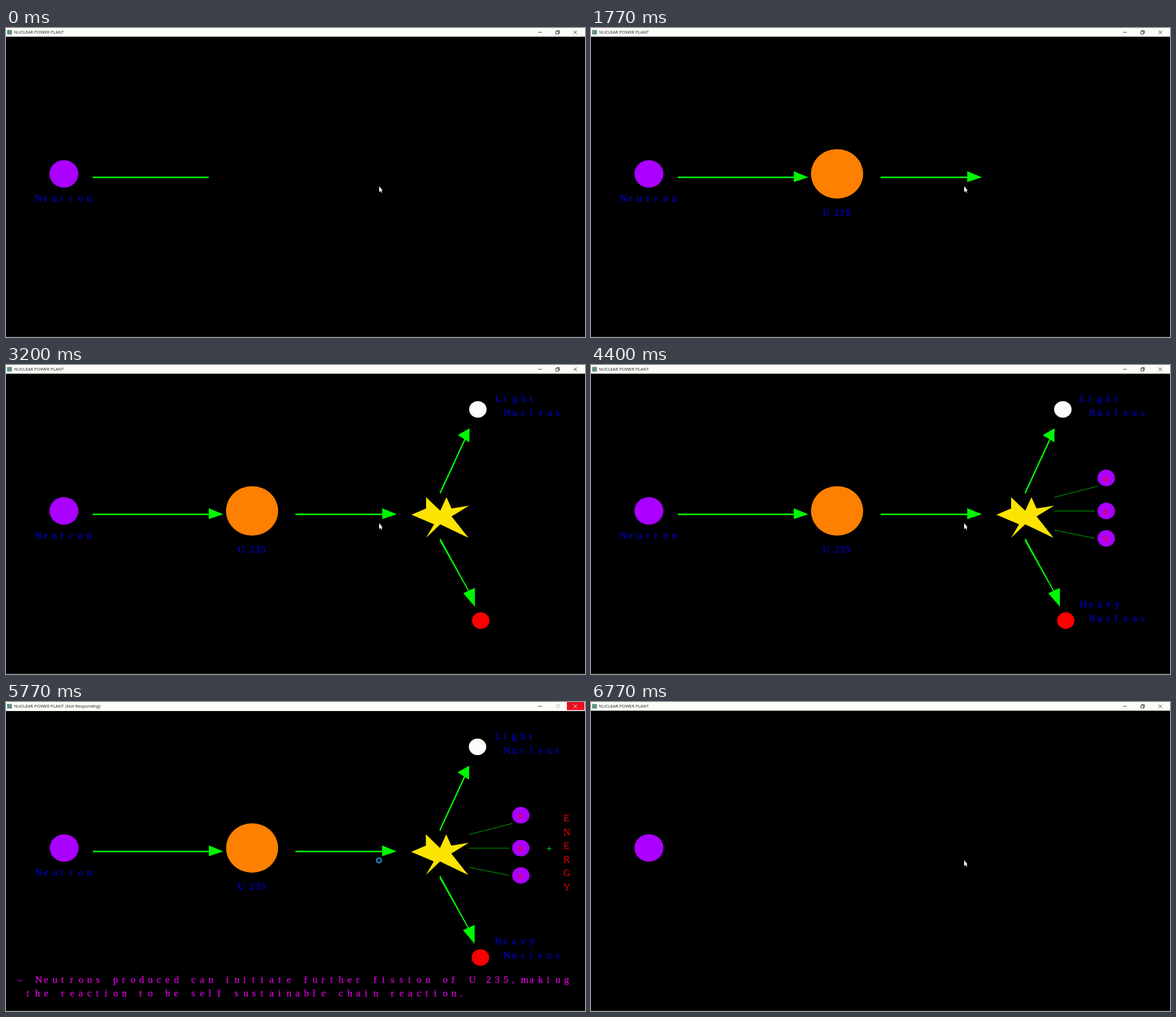
Write an HTML page that moves like this. It is 1024 px wide and 547 px high and loops after 6.81 s.

```html
<!DOCTYPE html>
<html lang="en">
<head>
<meta charset="utf-8">
<title>Nuclear power plant</title>
<style>
html, body { margin: 0; width: 100%; height: 100%; overflow: hidden; background: #000; }
svg { display: block; width: 1024px; height: 547px; }
.serif { font: 17.5px "Liberation Serif", serif; stroke-width: 0.3; white-space: pre; }
.title { font: 7.7px "Open Sans", sans-serif; fill: #1c1c1c; }
</style>
</head>
<body>
<svg id="stage" viewBox="0 0 1024 547"></svg>
<script>
const LOOP = 6810, CLEAR = 6630, HANG = 5560, PITCH = 15.36;
const GREEN = '#00f800', BLUE = '#0000c0', PURPLE = '#aa00ff';
const RED = '#d00000', PINK = '#d800d8', BAR = '#fdfdf8';
const stage = document.getElementById('stage');
const timed = [];

function add(parent, tag, attrs, text) {
  const el = document.createElementNS('http://www.w3.org/2000/svg', tag);
  for (const key in attrs) el.setAttribute(key, attrs[key]);
  if (text) el.textContent = text;
  parent.appendChild(el);
  return el;
}

// Shows an element from one time to another; the span may wrap round the loop.
function show(el, from, to = CLEAR) {
  timed.push({ el, from, to });
  return el;
}

const scene = add(stage, 'g', {});
const step = time => show(add(scene, 'g', {}), time);

const ball = (g, cx, cy, rx, fill) =>
  add(g, 'ellipse', { cx, cy, rx, ry: rx * 0.95, fill });
const poly = (g, points, fill = GREEN) => add(g, 'polygon', { points, fill });
const line = (g, x1, y1, x2, y2, width = 2.8, stroke = GREEN) =>
  add(g, 'line', { x1, y1, x2, y2, stroke, 'stroke-width': width });

// Every letter sits on its own fixed column.
function letters(g, str, x, y, fill, pitch = PITCH) {
  const xs = [...str].map((c, i) => (x + i * pitch).toFixed(2)).join(' ');
  add(g, 'text', { x: xs, y, fill, stroke: fill, class: 'serif' }, str);
}

const steps = [
  [6700, g => ball(g, 102.4, 258.2, 25.6, PURPLE)],
  [0, g => {
    letters(g, 'Neutron', 50.7, 307, BLUE);
    line(g, 153.4, 264.3, 358.6, 264.3);
  }],
  [220, g => poly(g, '358.6,253.6 384.3,264.3 358.6,272.8')],
  [460, g => ball(g, 435.2, 258.2, 46.1, '#fd8000')],
  [1000, g => letters(g, 'U 235', 409.6, 332, BLUE, 10.24)],
  [1400, g => line(g, 512, 264.3, 665.8, 264.3)],
  [1710, g => poly(g, '665.4,253.6 691.3,264.3 665.4,272.8')],
  [2000, g => poly(g, '717,265 743,254 743,234 768,258 779,234 788,254 819,249 ' +
    '788,268 818,306 768,282 743,306 757,282', '#fce300')],
  [2260, g => poly(g, '767.4,228.5 767.4,224.5 818.4,114 819.8,112 819.8,117 769,227')],
  [2510, g => poly(g, '819.6,112.3 819.6,137 799,124')],
  [2630, g => ball(g, 834.5, 78.7, 15.4, '#fcfcfc')],
  [2780, g => {
    letters(g, 'Light', 864.8, 65, BLUE);
    letters(g, 'Nucleus', 880.2, 90, BLUE);
  }],
  [2980, g => poly(g, '767.4,307 769.4,308.5 821.4,404 819.4,404 767.4,312')],
  [3100, g => poly(g, '829.3,394.5 829.3,428 808.8,404')],
  [3170, g => ball(g, 839.6, 452.5, 15.4, '#fc0000')],
  [3430, g => {
    letters(g, 'Heavy', 864.8, 429, BLUE);
    letters(g, 'Nucleus', 880.2, 454, BLUE);
  }],
  ...[[3700, 200, 234.3, 896, 214.6], [3940, 258.3, 258.5, 891, 258.5],
    [4180, 306.8, 292.3, 891, 306.8]].map(([time, cy, y1, x2, y2]) => [time, g => {
    line(g, 819, y1, x2, y2, 1, '#00b400');
    ball(g, 911.2, cy, 15.4, PURPLE);
    letters(g, 'n', 905.6, cy + 5.6, '#f0003c');
  }]),
  [5230, g => letters(g, '+', 956.6, 264.5, '#00f000')],
  [5290, g => [...'ENERGY'].forEach((c, i) =>
    letters(g, c, 986.6, 211 + i * 24.3, RED))],
  [5380, g => letters(g,
    '– Neutrons produced can initiate further fission of U 235,making', 20.2, 496.7, PINK)],
  [5460, g => letters(g,
    'the reaction to be self sustainable chain reaction.', 35.6, 521, PINK)]
];
for (const [time, draw] of steps) draw(step(time));

// Window frame
add(stage, 'rect', { y: 546, width: 1024, height: 1, fill: '#262626' });
add(stage, 'rect', { width: 1024, height: 15.4, fill: BAR });
add(stage, 'rect', { x: 2, y: 3.5, width: 8.5, height: 8, fill: '#5f8f88' });
add(stage, 'text', { x: 14, y: 10.4, class: 'title' }, 'NUCLEAR POWER PLANT');

function buttons(g, restore, cross) {
  line(g, 941, 7.5, 947.6, 7.5, 0.9, '#333');
  add(g, 'path', { d: 'M972.5 6h4.8v4.8h-4.8zM974 6v-1.4h4.7v4.8h-1.4',
    fill: 'none', stroke: restore, 'stroke-width': 0.9 });
  add(g, 'path', { d: 'M1003.8 4.6l6 6m0-6l-6 6', stroke: cross, 'stroke-width': 0.9 });
}

const normal = show(add(stage, 'g', {}), CLEAR, HANG);
buttons(normal, '#222', '#222');
add(normal, 'polygon', {
  points: '660,280 660,290.4 662.3,288.3 663.9,291.6 665.3,290.9 663.8,287.8 666,287.6',
  fill: '#fff'
});

const hung = show(add(stage, 'g', {}), HANG, CLEAR);
add(hung, 'rect', { y: 15, width: 1024, height: 1, fill: BAR });
add(hung, 'rect', { x: 992, width: 31, height: 14.4, fill: '#e81123' });
add(hung, 'text', { x: 105, y: 10.4, class: 'title' }, '(Not Responding)');
buttons(hung, '#ccc', '#fff');
add(hung, 'circle', { cx: 659.7, cy: 280.3, r: 4.1, fill: 'none',
  stroke: '#2b95e4', 'stroke-width': 2.2 });

function render(t) {
  for (const { el, from, to } of timed) {
    const on = from < to ? t >= from && t < to : t >= from || t < to;
    el.style.display = on ? '' : 'none';
  }
  // The frozen window holds a slightly shrunken copy of the scene.
  const frozen = t >= HANG && t < CLEAR;
  scene.setAttribute('transform', frozen ? 'translate(.7 .8) scale(.9985 .998)' : '');
}

let start;
function tick(now) {
  start ??= now;
  render((now - start) % LOOP);
  requestAnimationFrame(tick);
}
render(0);
requestAnimationFrame(tick);
</script>
</body>
</html>
```
